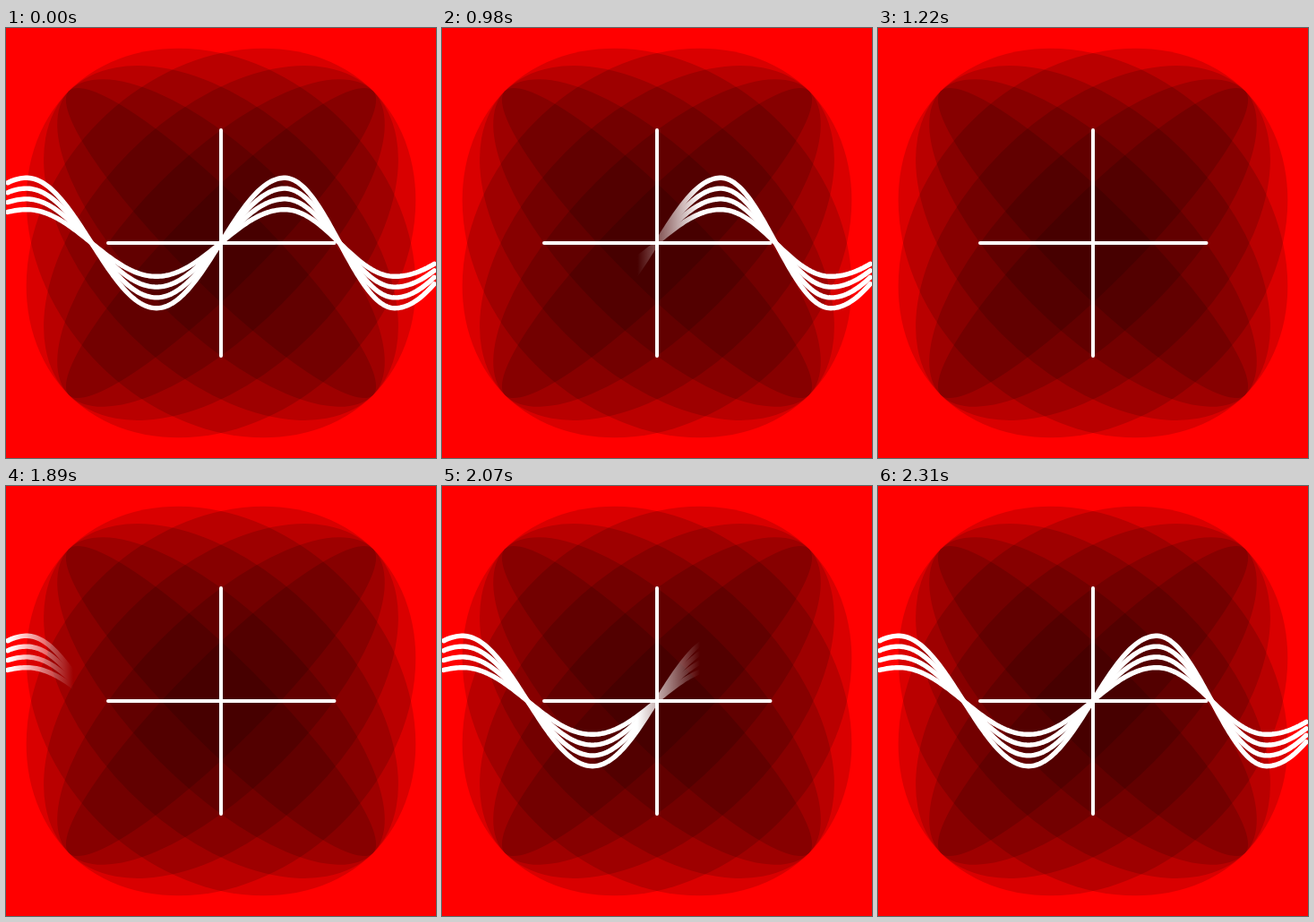
An HTML page that plays this animation: 480 by 480 pixels, repeating every 2980 ms.

```html
<!DOCTYPE html>
<html lang="en">
<head>
<meta charset="utf-8">
<title>Sine waves</title>
<style>
  html, body { margin: 0; width: 100%; height: 100%; overflow: hidden; background: #f00; }
  svg { display: block; width: 100vw; height: 100vh; }
</style>
</head>
<body>
<svg viewBox="0 0 480 480">
  <defs>
    <linearGradient id="fade" gradientUnits="userSpaceOnUse" x1="0" x2="70" y1="0" y2="0">
      <stop id="left" offset="0" stop-color="#fff"/>
      <stop id="right" offset="1" stop-color="#fff"/>
    </linearGradient>
    <mask id="wipe" maskUnits="userSpaceOnUse" x="0" y="0" width="480" height="480">
      <rect width="480" height="480" fill="url(#fade)"/>
    </mask>
  </defs>
  <rect width="480" height="480" fill="#f00"/>
  <g id="ellipses" fill="#000" fill-opacity=".15"></g>
  <path d="M240 114V366M114 240H366.5" stroke="#fff" stroke-width="4" stroke-linecap="round"/>
  <g mask="url(#wipe)">
    <g id="waves" fill="none" stroke="#fff" stroke-width="5.4" stroke-linecap="round"></g>
  </g>
</svg>
<script>
const LOOP = 2980, STEP = 60, STEPS = 8, ERASE = 800, REVEAL = 1890;
const FADE = 70, ADVANCE = 71;
const TURNS = [-147, 23, 168, 311, 434, 589]; // trough and crest positions, alternating

const $ = id => document.getElementById(id);

function add(parent, tag, attrs) {
  const el = document.createElementNS('http://www.w3.org/2000/svg', tag);
  for (const key in attrs) el.setAttribute(key, attrs[key]);
  parent.appendChild(el);
}

// Half a cosine between each pair of turning points
function wave(x) {
  let i = 0;
  while (x > TURNS[i + 1]) i++;
  const phase = (x - TURNS[i]) / (TURNS[i + 1] - TURNS[i]);
  return Math.cos(Math.PI * phase) * (i % 2 ? -1 : 1);
}

function wavePath(amp) {
  const points = [];
  for (let x = 2; x <= 478; x += 2) points.push(x + ' ' + (240 + amp * wave(x)).toFixed(2));
  return 'M' + points.join('L');
}

for (const angle of [45, -45]) {
  for (let ry = 192; ry > 0; ry -= 48) {
    add($('ellipses'), 'ellipse', { cx: 240, cy: 240, rx: 240, ry, transform: `rotate(${angle} 240 240)` });
  }
}
for (let i = 0; i < 4; i++) add($('waves'), 'path', { d: wavePath(37.3 + 11.8 * i) });

function draw(t) {
  const revealing = t >= REVEAL;
  const since = t - (revealing ? REVEAL : ERASE);
  const step = Math.max(0, Math.min(STEPS, Math.floor(since / STEP) + 1));
  const edge = 5 + ADVANCE * (step - 1);
  $('fade').setAttribute('x1', edge);
  $('fade').setAttribute('x2', edge + FADE);
  $('left').setAttribute('stop-opacity', revealing ? 1 : 0);
  $('right').setAttribute('stop-opacity', revealing ? 0 : 1);
}

const start = performance.now();
function tick() {
  draw((performance.now() - start) % LOOP);
  requestAnimationFrame(tick);
}
tick();
</script>
</body>
</html>
```
